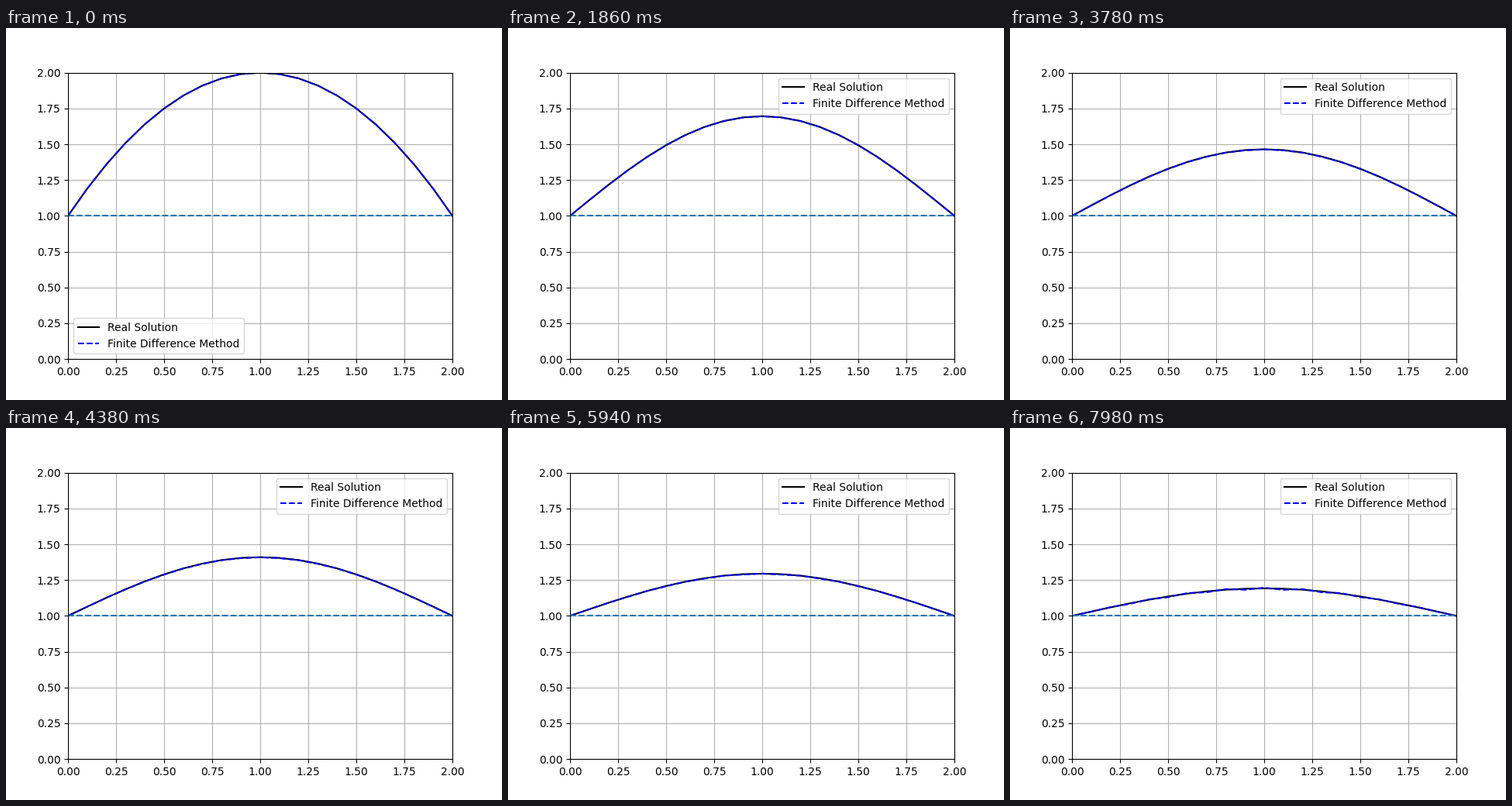
These frames come from a looping animation (640 by 480 pixels, 8 s). A matplotlib script:

```python
import numpy as np
import matplotlib.pyplot as plt
from matplotlib.animation import FuncAnimation

LENGTH = 2.0
CELLS = 20
DX = LENGTH / CELLS
DT = 1 / 195      # slightly above the stability limit, so ripples grow late
STEP_MS = 60
TICK_MS = 20
LOOP_MS = 8000
STEPS = -(-LOOP_MS // STEP_MS)

x = np.linspace(0, LENGTH, CELLS + 1)


def exact(t):
    """Fourier series of the heat equation started from 1 + 2x - x^2."""
    if t == 0:
        return 1 + 2 * x - x**2
    n = np.arange(1, 60, 2)[:, None]
    k = n * np.pi / LENGTH
    terms = 32 / (n * np.pi)**3 * np.sin(k * x) * np.exp(-k**2 * t)
    return 1 + terms.sum(axis=0)


def explicit_steps(count):
    """Forward-time, centred-space solution at each time step."""
    u = exact(0)
    rows = [u]
    for _ in range(count - 1):
        u = u.copy()
        u[1:-1] += DT / DX**2 * np.diff(u, 2)
        rows.append(u)
    return rows


exact_rows = [exact(i * DT) for i in range(STEPS)]
approx_rows = explicit_steps(STEPS)

plt.rcParams["font.family"] = "DejaVu Sans"
fig, ax = plt.subplots(figsize=(6.4, 4.8), dpi=100)
real_line, = ax.plot(x, exact_rows[0], "k-", label="Real Solution")
approx_line, = ax.plot(x, approx_rows[0], "b--",
                       label="Finite Difference Method")
ax.axhline(1, color="C0", linestyle="--")
ax.set_xlim(0, LENGTH)
ax.set_ylim(0, 2)
ax.grid()
ax.legend(loc="best")  # moves to the upper right once the curve is low enough


def update(tick):
    i = tick * TICK_MS // STEP_MS
    real_line.set_ydata(exact_rows[i])
    approx_line.set_ydata(approx_rows[i])
    return real_line, approx_line


anim = FuncAnimation(fig, update, frames=LOOP_MS // TICK_MS,
                     interval=TICK_MS, repeat=True, repeat_delay=0)
plt.show()
```
